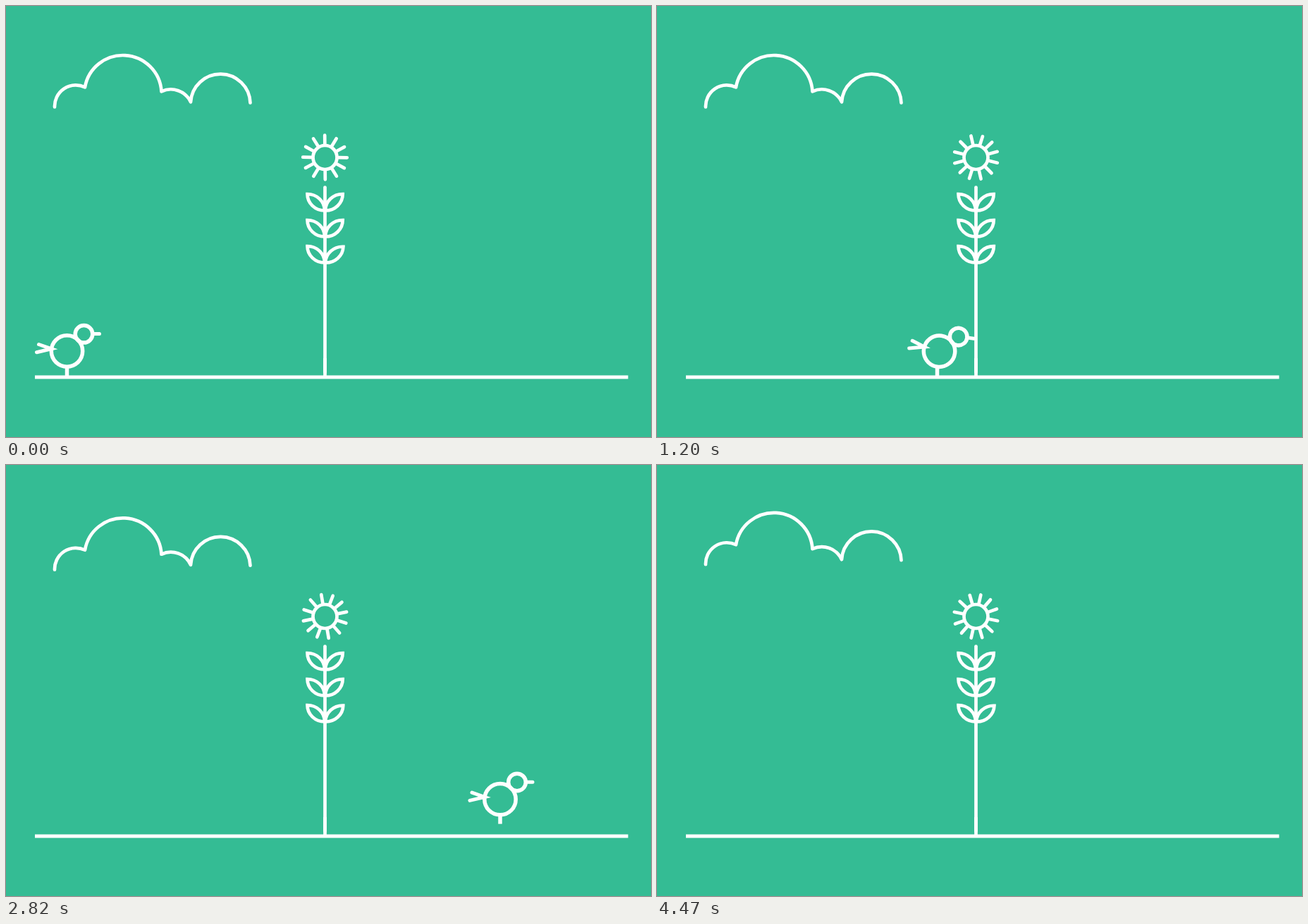
Animation of 915 by 612 pixels, one loop 4500 ms. Source, as an HTML page:

```html
<!DOCTYPE html>
<html lang="en">
<head>
<meta charset="utf-8">
<title>Bird and flower</title>
<style>
  html, body { margin: 0; width: 100%; height: 100%; overflow: hidden; background: #34bc94; }
  svg { display: block; width: 915px; height: 612px; }
</style>
</head>
<body>
<svg viewBox="0 0 915 612" fill="none" stroke="#fff" stroke-width="4.7">
  <path id="cloud" stroke-linecap="round" stroke-linejoin="round"
    d="M69 143A30 30 0 0 1 112 115A54.7 54.7 0 0 1 220.5 121A31 31 0 0 1 262 136A42.3 42.3 0 0 1 346.5 137"/>
  <path d="M41 527H882.5" stroke-width="5"/>
  <path d="M452.5 257.5V520" stroke-linecap="round"/>
  <path d="M452.5 500V527"/>
  <g id="leaves"></g>
  <circle cx="452.5" cy="215" r="17"/>
  <g id="rays" stroke-linecap="round"></g>
  <g id="bird" stroke-width="5.5">
    <path d="M0 22V35"/>
    <g id="body">
      <circle r="22.2"/>
      <circle cx="24" cy="-24.2" r="12.3"/>
      <path d="M37 -24.5H46M-40 -9.5L-22 -3.2L-43 1.7" stroke-width="5" stroke-linecap="round"/>
    </g>
  </g>
</svg>
<script>
const LOOP = 4500, STEP = 30, TAU = Math.PI * 2;
const $ = id => document.getElementById(id);
const move = (el, value) => el.setAttribute('transform', value);

function add(parent, d) {
  const path = document.createElementNS('http://www.w3.org/2000/svg', 'path');
  path.setAttribute('d', d);
  return parent.appendChild(path);
}

let lowLeaf;
for (const y of [290.5, 327.5, 364.5]) {
  add($('leaves'), `M452 ${y}A24.5 23.5 0 0 0 427.5 ${y - 23.5}A24.5 23.5 0 0 0 452 ${y}Z`);
  lowLeaf = add($('leaves'), `M453 ${y}A24.5 23.5 0 0 1 477.7 ${y - 23.5}A24.5 23.5 0 0 1 453 ${y}Z`);
}

// The rays are spaced slightly unevenly.
for (let a = 0; a < 360; a += 30) {
  const skew = 1.7 * Math.cos((a - 55) * TAU / 180);
  move(add($('rays'), 'M0 -19V-31.3'), `translate(452.5 215) rotate(${a + skew})`);
}

// Bird x over time, counted in steps.
const walk = [[0, 86.5], [17, 215.5], [31, 322], [38.5, 397.5], [52.3, 397.5], [62, 467],
  [72, 538.5], [90, 673], [94, 701], [108, 797.5], [116, 853.5], [150, 1097]];

function along(table, n) {
  const i = Math.max(1, table.findIndex(p => p[0] >= n));
  const [n0, x0] = table[i - 1], [n1, x1] = table[i];
  return x0 + (x1 - x0) * (n - n0) / (n1 - n0);
}

const arc = u => 4 * u * (1 - u);

function hop(n) {
  if (n < 30.9) return 30 * arc(n / 10.3 % 1);
  if (n < 38.5) return 30 * arc((n - 30.9) / 7.6);
  if (n < 49.9) return 0;
  return 29.5 * arc((n - 49.9) / 9.1 % 1);
}

const peck = n => n > 38 && n < 50 ? 10.6 * Math.sin((n - 38) / 6 * Math.PI) ** 2 : 0;

function draw(n) {
  move($('cloud'), `translate(0 ${-5.25 - 11.25 * Math.cos(TAU * (n - 20) / 30)})`);
  move($('rays'), `rotate(${3.397 * Math.min(n, 136)} 452.5 215)`);
  move(lowLeaf, `rotate(${0.9 + 0.9 * Math.cos(TAU * (n - 29) / 30)} 453 364.5)`);
  move($('bird'), `translate(${along(walk, n)} ${490 - hop(n)})`);
  move($('body'), `rotate(${peck(n)} 0 22)`);
}

const start = performance.now();
function tick() {
  draw(Math.floor((performance.now() - start) % LOOP / STEP));
  requestAnimationFrame(tick);
}
tick();
</script>
</body>
</html>
```
